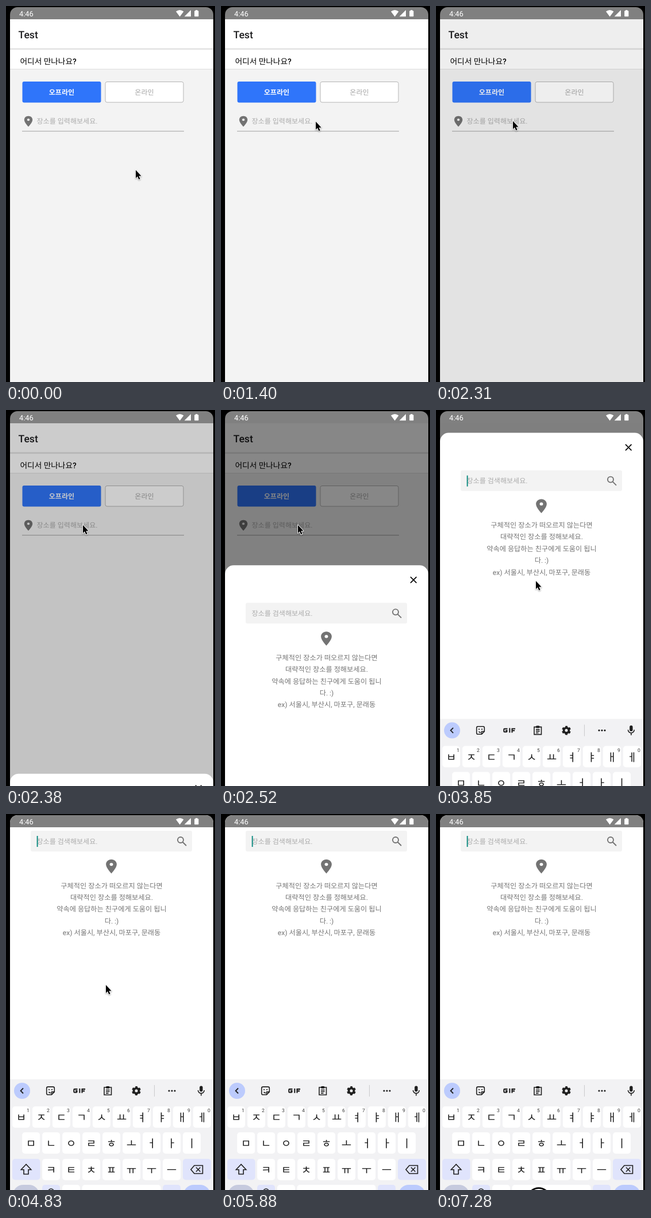
An HTML page that plays this animation: 364x652 px, repeating every 7350 ms.

```html
<!DOCTYPE html>
<html lang="ko">
<head>
<meta charset="utf-8">
<style>
  html, body { margin: 0; height: 100%; overflow: hidden; background: #000; }
  svg { display: block; width: 100vw; height: 100vh; }
  text { font-family: Roboto, "Noto Sans CJK KR", "Noto Sans CJK", sans-serif; text-rendering: geometricPrecision; }
  .line { fill: none; stroke: #1f1f1f; stroke-width: 1.6; }
</style>
</head>
<body>
<svg id="stage" viewBox="0 0 364 652"></svg>
<script>
const LOOP = 7350, TICK = 70;

const rect = (x, y, w, h, fill, r = 0, extra = '') =>
  `<rect x="${x}" y="${y}" width="${w}" height="${h}" rx="${r}" fill="${fill}" ${extra}/>`;
const text = (x, y, size, fill, str, extra = '') =>
  `<text x="${x}" y="${y}" font-size="${size}" fill="${fill}" ${extra}>${str}</text>`;
const mid = 'text-anchor="middle"';
const line = (d, extra = '') => `<path class="line" d="${d}" ${extra}/>`;
const dot = (x, y, r, fill) => `<circle cx="${x}" cy="${y}" r="${r}" fill="${fill}"/>`;
const pin = (x, y, sx, sy) =>
  `<path transform="translate(${x} ${y}) scale(${sx} ${sy})" fill="#737373" fill-rule="evenodd"
    d="M0-10C-3.9-10-7-6.9-7-3C-7 2.2 0 10 0 10S7 2.2 7-3C7-6.9 3.9-10 0-10ZM0-.8a2.2 2.2 0 1 1 0-4.4a2.2 2.2 0 1 1 0 4.4Z"/>`;

const page = rect(7, 23, 354, 629, '#f3f3f3') +
  rect(7, 23, 354, 50, '#fff') + rect(7, 73, 354, 3, '#e6e6e6') +
  text(21.5, 56, 17.6, '#1c1c1e', 'Test', 'font-weight="500"') +
  rect(7, 76, 354, 33, '#fff') + rect(7, 109, 354, 1, '#dedede') +
  text(24.5, 101, 13.7, '#000', '어디서 만나나요?', 'font-weight="500"') +
  rect(28.5, 131, 137, 36.5, '#2f75fa', 3) +
  text(97, 154, 12.1, '#fff', '오프라인', mid + ' font-weight="700"') +
  rect(173, 131.5, 136, 35.5, '#fff', 3, 'stroke="#b4b4b4"') +
  text(241, 154, 12.1, '#a6a6a6', '온라인', mid) +
  pin(39, 200, 1.03, .92) +
  text(53.5, 204, 12.05, '#ababab', '장소를 입력해보세요.') +
  rect(28, 216.5, 282, 1.3, '#b3b3b3');

const hint = ['구체적인 장소가 떠오르지 않는다면', '대략적인 장소를 정해보세요.',
  '약속에 응답하는 친구에게 도움이 됩니', '다. :)', 'ex) 서울시, 부산시, 마포구, 문래동'];
const sheet = rect(7, 0, 354, 760, '#fff', 15) +
  line('M330 20l10.5 10.5m0-10.5l-10.5 10.5', 'style="stroke:#000"') +
  rect(43, 65, 281, 36, '#f3f3f3', 3) +
  text(53.5, 87.5, 12.05, '#ababab', '장소를 검색해보세요.') +
  line('M308 85l6 6M309 81a5 5 0 1 1-10 0a5 5 0 1 1 10 0', 'style="stroke:#737373;stroke-width:1.9"') +
  pin(183.5, 127, 1.34, 1.22) +
  hint.map((s, i) => text(184, 164.5 + i * 20.4, 12.2, '#757575', s, mid)).join('') +
  rect(53.7, 74, 1.8, 19, '#00857a', 0, 'id="caret"');

const keyRow = (letters, x, y, size = 19) => [...letters].map((c, i) =>
  rect(x + i * 35 - 15.5, y, 31, 37, '#fff', 5) +
  text(x + i * 35, y + 26, size, '#1b1b1b', c, mid)).join('');
const pale = '#e0e4fc', accent = '#bccbfd';
const keyboard = rect(7, 460, 354, 260, '#f2f2f4') +
  dot(28, 480, 14, accent) + line('M30 475.5l-4.5 4.5l4.5 4.5', 'style="stroke-width:1.8"') +
  line('M79.5 486.7h-6.5a2.3 2.3 0 0 1-2.3-2.3v-9a2.3 2.3 0 0 1 2.3-2.3h9a2.3 2.3 0 0 1 2.3 2.3v6.5zv-4.8h4.8M74.5 482q1.5 2 3.5 1.6') +
  dot(75, 478, 1.1, '#1f1f1f') + dot(80, 478, 1.1, '#1f1f1f') +
  line('M124.5 477.1h-5.2a1 1 0 0 0-1 1v3.6a1 1 0 0 0 1 1h3.2a1 1 0 0 0 1-1v-1.6h-2.5M128.3 476v7.8M132.5 483.8v-6.7h5.5M132.5 480.4h4.6', 'style="stroke-width:2.1"') +
  line('M171 474h12.5v13h-12.5zM174 478.5h6.5m-6.5 2.8h6.5m-6.5 2.8h4.5') +
  rect(174, 472, 6.5, 4, '#1f1f1f', 1.5) +
  '<g fill="none" stroke="#1f1f1f"><circle cx="227" cy="480" r="4.4" stroke-width="3.8"/>' +
  '<circle cx="227" cy="480" r="6.7" stroke-width="2.4" stroke-dasharray="3.9 3.116" stroke-dashoffset="1.95" transform="rotate(-90 227 480)"/></g>' +
  rect(258, 470, 1, 20, '#c9c9cc') +
  [284, 289, 294].map(x => dot(x, 480, 1.6, '#1f1f1f')).join('') +
  rect(337.2, 471.5, 5.4, 10, '#1f1f1f', 2.7) + line('M334.5 479a5.4 5.4 0 0 0 10.8 0M339.9 484.5v4') +
  keyRow('ㅂㅈㄷㄱㅅㅛㅕㅑㅐㅔ', 26.4, 507) +
  [...'1234567890'].map((n, i) => text(38.5 + i * 35, 517, 8.6, '#3c3c3c', n, mid)).join('') +
  keyRow('ㅁㄴㅇㄹㅎㅗㅓㅏㅣ', 43.6, 552) +
  rect(11, 598, 48.5, 36.5, pale, 5) +
  line('M35 607.5l-8.7 9.3h4.7v7.7h8v-7.7h4.7z') +
  keyRow('ㅋㅌㅊㅍㅠㅜㅡ', 78.6, 598) +
  rect(308, 598, 49, 36.5, pale, 5) +
  line('M328 609.5h14.5v14h-14.5l-6-7zM331 612.8l7.4 7.4m0-7.4l-7.4 7.4') +
  rect(12, 643, 46, 37, '#c6cade', 18) + rect(63, 643, 31, 37, pale, 5) +
  line('M73.5 655a5 5 0 0 1 10 0', 'style="stroke-width:1.3"') +
  rect(98, 643, 31, 37, '#fff', 5) + rect(132.5, 643, 137, 37, '#fff', 5) +
  rect(273, 643, 31, 37, pale, 5) + rect(309, 643, 47, 37, accent, 18);

const statusBar = rect(7, 2, 354, 21, '#808080') +
  text(23, 17.5, 12.8, '#fff', '4:46') +
  '<path fill="#fff" d="M302.7 18.5L296 9.5Q302.7 4.5 309.4 9.5ZM322 7v11.3h-11.3ZM328.2 9a.8.8 0 0 1 .8-.8h1.2V7h3.2v1.2h1.2a.8.8 0 0 1 .8.8v8.5a.8.8 0 0 1-.8.8h-5.6a.8.8 0 0 1-.8-.8Z"/>';

const stage = document.getElementById('stage');
stage.innerHTML = `
  <clipPath id="device"><rect x="7" y="2" width="354" height="700" rx="13"/></clipPath>
  <rect width="364" height="652"/>
  <g clip-path="url(#device)">
    ${page}
    ${rect(7, 23, 354, 629, '#000', 0, 'id="dim"')}
    <g id="sheet">${sheet}</g>
    <g id="keyboard">${keyboard}</g>
    ${statusBar}
  </g>
  <g id="ring" fill="none"><circle r="20" stroke="#fff" stroke-opacity=".6" stroke-width="4"/><circle r="20.3" stroke="#000" stroke-width="2.8"/></g>
  <path id="cursor" d="M0-.5V13.2L3-10.6 3 10.4 5.3 15.8 7.6 14.8 5.3 9.6H9.6Z" stroke="#fff" stroke-width="1.8"
    stroke-linejoin="round" paint-order="stroke" style="filter:drop-shadow(0 1px 1px rgba(0,0,0,.35))"/>`;
const el = id => document.getElementById(id);
el('cursor').setAttribute('d', 'M0-.5V13.4L3 10.6 5.3 15.8 7.6 14.8 5.3 9.8H9.6Z');

const progress = (t, start, length) => Math.min(1, Math.max(0, (t - start) / length));
const smooth = p => p * p * (3 - 2 * p);

// cubic-bezier(.4, 0, .2, 1), solved by bisection
function standard(x) {
  let lo = 0, hi = 1, s = .5;
  for (let i = 0; i < 24; i++) {
    s = (lo + hi) / 2;
    const at = 1.2 * s * (1 - s) ** 2 + .6 * s * s * (1 - s) + s ** 3;
    if (at < x) lo = s; else hi = s;
  }
  return smooth(s);
}

// start, duration, destination, easing
const moves = [
  [0, 770, 169, 201, smooth],
  [1330, 630, 134, 200, p => p],
  [2870, 630, 174, 297, p => 1 - (1 - p) ** 3],
  [4900, 350, 337, 612, p => p ** 1.5],
];
// start, end, centre
const clicks = [[910, 980, 169, 201], [1960, 2100, 134, 200], [3500, 3570, 174, 297], [7280, 7350, 179, 669]];

const place = (id, x, y) => el(id).setAttribute('transform', `translate(${x} ${y})`);
const show = (id, on) => el(id).setAttribute('visibility', on ? 'visible' : 'hidden');

function draw(t) {
  const lift = 248 * standard(progress(t, 3690, 360));
  place('sheet', 0, 652 - 440 * standard(progress(t, 2340, 304)) - lift);
  place('keyboard', 0, 248 - lift);
  el('dim').setAttribute('opacity', .5 * progress(t, 2276, 260));
  show('caret', t >= 3790 && Math.floor((t - 3790) / 520) % 2 === 0);

  let x = 226, y = 285;
  for (const [start, length, toX, toY, ease] of moves) {
    const p = ease(progress(t, start, length));
    x += (toX - x) * p;
    y += (toY - y) * p;
  }
  place('cursor', x, y);
  show('cursor', t < 5320);

  const click = clicks.find(([from, to]) => t >= from && t < to);
  show('ring', click);
  if (click) place('ring', click[2], click[3]);
}

function frame() {
  draw(Math.floor(performance.now() % LOOP / TICK) * TICK);
  requestAnimationFrame(frame);
}
frame();
</script>
</body>
</html>
```
